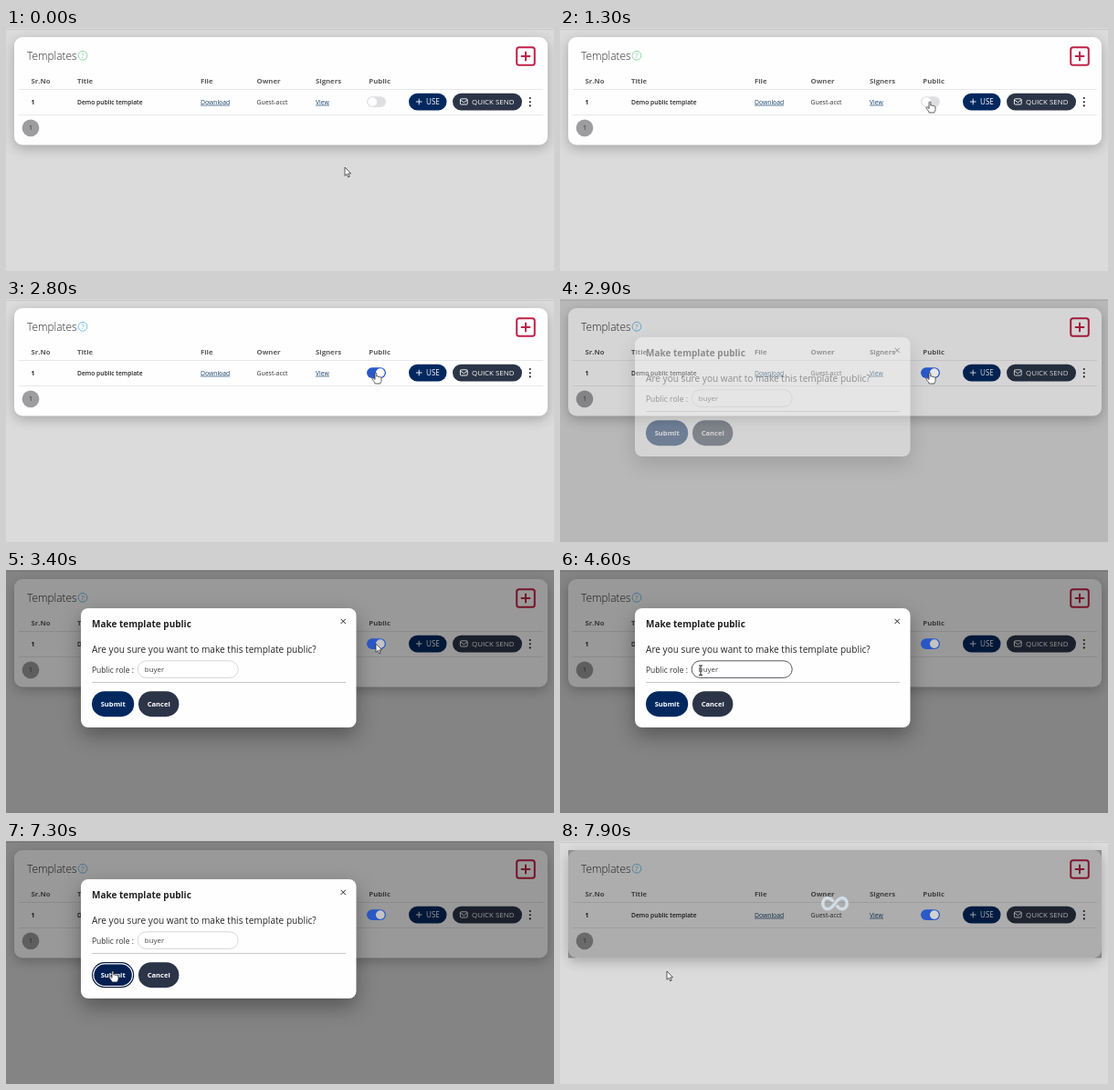
Write an HTML page with a canvas that moves like this. It is 600 px wide and 267 px high and loops after 8000 ms.

```html
<!DOCTYPE html>
<html lang="en">
<head>
<meta charset="utf-8">
<title>Make template public</title>
<style>
html, body { margin: 0; width: 100%; height: 100%; overflow: hidden; background: #dcdbdc; }
canvas { display: block; width: 600px; height: 267px; }
</style>
</head>
<body>
<canvas id="stage"></canvas>
<script>
const W = 600, H = 267, LOOP = 8000, STEP = 100;
const NAVY = '#00285f', SLATE = '#2b3547', INK = '#222';
const canvas = document.getElementById('stage');
const dpr = window.devicePixelRatio || 1;
canvas.width = W * dpr;
canvas.height = H * dpr;
const c = canvas.getContext('2d');

// Pointer track: time, x, y of the hot spot
const track = [
  [0, 371, 153], [200, 371, 153], [800, 405, 81], [3700, 405, 81],
  [4200, 196, 143], [4500, 154, 110], [4800, 154, 110], [5200, 192, 143],
  [5400, 199, 136], [5600, 199, 133], [6300, 199, 133], [6900, 121, 149],
  [7200, 117, 143], [8000, 117, 143]
];

const clamp = v => Math.max(0, Math.min(1, v));
const ease = p => p * p * (3 - 2 * p);

function pointerAt(t) {
  const i = track.findIndex((k, n) => n > 0 && t <= k[0]);
  const a = track[i - 1], b = track[i];
  const p = ease((t - a[0]) / (b[0] - a[0]));
  return [a[1] + (b[1] - a[1]) * p, a[2] + (b[2] - a[2]) * p];
}

function pointerKind(t) {
  if (t >= 800 && t < 3000) return 'hand';
  if (t >= 4500 && t < 5000) return 'beam';
  if (t >= 6900 && t < 7400) return 'hand';
  return 'arrow';
}

function box(x, y, w, h, r, fill, stroke, lw = 1) {
  c.beginPath();
  c.roundRect(x, y, w, h, r);
  if (fill) { c.fillStyle = fill; c.fill(); }
  if (stroke) { c.strokeStyle = stroke; c.lineWidth = lw; c.stroke(); }
}

function disc(x, y, r, fill) {
  c.beginPath();
  c.arc(x, y, r, 0, Math.PI * 2);
  c.fillStyle = fill;
  c.fill();
}

function lines(color, lw, ...paths) {
  c.beginPath();
  for (const p of paths)
    for (let i = 0; i < p.length; i += 2)
      i ? c.lineTo(p[i], p[i + 1]) : c.moveTo(p[i], p[i + 1]);
  c.strokeStyle = color;
  c.lineWidth = lw;
  c.stroke();
}

function plus(x, y, r, color, lw) {
  lines(color, lw, [x - r, y, x + r, y], [x, y - r, x, y + r]);
}

function text(s, x, y, size, color = INK, weight = 400, align = 'left') {
  c.font = `${weight} ${size}px "Open Sans", "Noto Sans", sans-serif`;
  c.textAlign = align;
  c.fillStyle = color;
  c.fillText(s, x, y);
}

function link(s, x, y, w) {
  text(s, x, y, 6.8, '#17456b');
  lines('#17456b', 0.7, [x, y + 1.4, x + w, y + 1.4]);
}

function shadow(color, blur, dy) {
  c.shadowColor = color;
  c.shadowBlur = blur * dpr;
  c.shadowOffsetY = dy * dpr;
}

function drawPage(on) {
  c.fillStyle = '#dcdbdc';
  c.fillRect(0, 0, W, H);
  c.fillStyle = '#c9c7ca';
  c.fillRect(0, 1, W, 1);

  c.save();
  shadow('rgba(0,0,0,.24)', 13, 4);
  box(9, 10, 584, 118.5, 9, '#fffeff');
  c.restore();

  text('Templates', 23, 35.4, 11.9, '#2c2c2c', 300);
  const help = on ? '#62b9e4' : '#7fd79a';
  c.beginPath();
  c.arc(84, 30.3, 4.9, 0, Math.PI * 2);
  c.strokeStyle = help;
  c.lineWidth = 0.9;
  c.stroke();
  text('?', 84, 33.2, 8, help, 400, 'center');

  box(559.2, 21.2, 19.6, 19.6, 2.5, null, '#c02148', 2);
  plus(569, 31, 5.2, '#c02148', 2);

  const heads = [['Sr.No', 27.5], ['Title', 78], ['File', 213], ['Owner', 274.5], ['Signers', 339], ['Public', 397.3]];
  for (const [s, x] of heads) text(s, x, 60.8, 7.75, '#5c5c5e', 700);
  lines('#e6e5e7', 0.9, [14, 67.5, 588, 67.5], [14, 95.5, 588, 95.5]);

  text('1', 27.5, 83.6, 6.9, INK, 700);
  text('Demo public template', 78, 83.6, 6.7, INK, 600);
  link('Download', 213, 83.6, 32);
  text('Guest-acct', 274.5, 83.6, 6.9, '#333');
  link('View', 339, 83.6, 15);

  box(441, 71.7, 41.5, 18.8, 9.4, NAVY);
  plus(452.2, 81, 3.3, '#fff', 0.9);
  text('USE', 460, 84, 8.1, '#fff', 500);

  box(489, 71.7, 76, 18.8, 9.4, SLATE);
  box(497.4, 77.8, 7.8, 6.2, 1, null, '#fff', 0.9);
  lines('#fff', 0.9, [497.6, 79, 501.3, 81.8, 505, 79]);
  text('QUICK SEND', 510, 84, 7.9, '#fff', 500);
  for (const y of [77, 81.2, 85.4]) disc(573.8, y, 1.05, '#222');

  disc(27, 109.8, 9.4, '#9d9c9e');
  text('1', 27, 112.4, 7, '#333', 400, 'center');
}

function drawToggle(on, dim) {
  box(395, 75.2, 21, 11.8, 5.9, on ? '#2a59c8' : '#dfdee1');
  const v = Math.round(255 - 150 * dim);
  disc(on ? 409.8 : 401.2, 81.1, 4.9, `rgb(${v},${v},${v})`);
}

function drawModal(field, submit) {
  c.save();
  shadow('rgba(0,0,0,.35)', 22, 9);
  box(82, 42, 301.5, 131, 8, '#fffeff');
  c.restore();

  text('Make template public', 94, 62.8, 10, '#1f2023', 700);
  lines('#222', 1, [366.6, 53.8, 371.8, 59], [371.8, 53.8, 366.6, 59]);
  text('Are you sure you want to make this template public?', 94, 91.4, 10.1, '#262626');
  text('Public role :', 94, 112.7, 8.5, '#333');
  box(144.2, 99.8, 110, 18.6, 9.3, '#fff', field ? '#55585e' : '#d3d3d6', field ? 1 : 0.9);
  text('buyer', 151.8, 112.4, 7.9, '#444');
  lines('#c9c8cb', 1, [94, 123.5, 372, 123.5]);

  if (submit) {
    box(94.6, 133.7, 45, 27, 13.5, '#fff', '#0b1c3d', 1.2);
    box(96.4, 135.5, 41.4, 23.4, 11.7, '#001f52');
  } else {
    box(94, 133.2, 46.2, 28, 14, NAVY);
  }
  text('Submit', 117.2, 150.3, 7.6, '#fff', 700, 'center');
  box(145, 133.2, 44.4, 28, 14, SLATE);
  text('Cancel', 167.2, 150.3, 7.6, '#fff', 700, 'center');
}

function drawLoader(t) {
  c.fillStyle = 'rgba(0,0,0,.32)';
  c.fillRect(9, 10, 584, 118.5);
  // Figure eight with a short gap that travels along it
  const gap = 0.25 + (t - 7900) / 2000;
  c.beginPath();
  for (let i = 0; i <= 80; i++) {
    const a = (gap + 0.06 + 0.88 * i / 80) * Math.PI * 2;
    const d = 1 + Math.sin(a) ** 2;
    const x = 301 + 13.2 * Math.cos(a) / d;
    const y = 68.7 + 17 * Math.sin(a) * Math.cos(a) / d;
    i ? c.lineTo(x, y) : c.moveTo(x, y);
  }
  c.strokeStyle = '#d2dde5';
  c.lineWidth = 3.4;
  c.lineCap = 'round';
  c.stroke();
  c.lineCap = 'butt';
}

const arrow = new Path2D('M0 0V9.4L2.2 7.4L3.7 10.9L5.2 10.2L3.7 6.9H6.6Z');
const hand = new Path2D('M-1 .8C-1-.3 .8-.3 .8 .8V4.2C1.2 3.5 2.5 3.7 2.6 4.5C3.2 3.9 4.3 4.2 4.4 5C5.1 4.6 6 5 6 5.9V8.5C6 10.2 5 10.8 4.8 12H-.8C-1.2 10.2-3.3 8.5-4 7C-4.4 6-3.2 5.4-2.3 6.3L-1 7.6Z');

function drawPointer(t) {
  const [x, y] = pointerAt(t), kind = pointerKind(t);
  c.save();
  c.translate(x, y);
  if (kind === 'beam') {
    lines('#222', 1, [-2, -5, 2, -5], [0, -5, 0, 5.5], [-2, 5.5, 2, 5.5]);
  } else {
    const shape = kind === 'hand' ? hand : arrow;
    c.fillStyle = '#fff';
    c.fill(shape);
    c.strokeStyle = '#333';
    c.lineWidth = 0.8;
    c.lineJoin = 'round';
    c.stroke(shape);
  }
  c.restore();
}

function draw(t) {
  const on = t >= 2800;
  const show = t < 7300 ? clamp((t - 2800) / 250) : clamp(1 - (t - 7300) / 250);
  const loading = t >= 7400;
  c.setTransform(dpr, 0, 0, dpr, 0, 0);
  drawPage(on);
  if (loading) drawLoader(t);
  if (show) {
    c.fillStyle = `rgba(0,0,0,${0.4 * show})`;
    c.fillRect(0, 0, W, H);
  }
  drawToggle(on, Math.max(0.4 * show, loading ? 0.3 : 0));
  if (show) {
    // Flatten the dialog first so that it fades as one piece
    c.globalAlpha = show;
    if (show < 1) c.drawImage(dialog(t), 0, 0, W, H);
    else drawModal(t >= 4500 && t < 5500, t >= 7200);
    c.globalAlpha = 1;
  }
  drawPointer(t);
}

const layers = {};
function dialog(t) {
  const pressed = t >= 7200;
  if (!layers[pressed]) {
    const base = document.createElement('canvas');
    base.width = canvas.width;
    base.height = canvas.height;
    layers[pressed] = base;
    const keep = c.globalAlpha;
    c.save();
    c.globalAlpha = 1;
    const page = document.createElement('canvas');
    page.width = canvas.width;
    page.height = canvas.height;
    page.getContext('2d').drawImage(canvas, 0, 0);
    c.clearRect(0, 0, W, H);
    drawModal(false, pressed);
    base.getContext('2d').drawImage(canvas, 0, 0);
    c.clearRect(0, 0, W, H);
    c.drawImage(page, 0, 0, W, H);
    c.restore();
    c.globalAlpha = keep;
  }
  return layers[pressed];
}

let start = null;
function tick(now) {
  if (start === null) start = now;
  const t = (now - start) % LOOP;
  draw(Math.floor(t / STEP) * STEP);
  requestAnimationFrame(tick);
}
requestAnimationFrame(tick);
</script>
</body>
</html>
```
